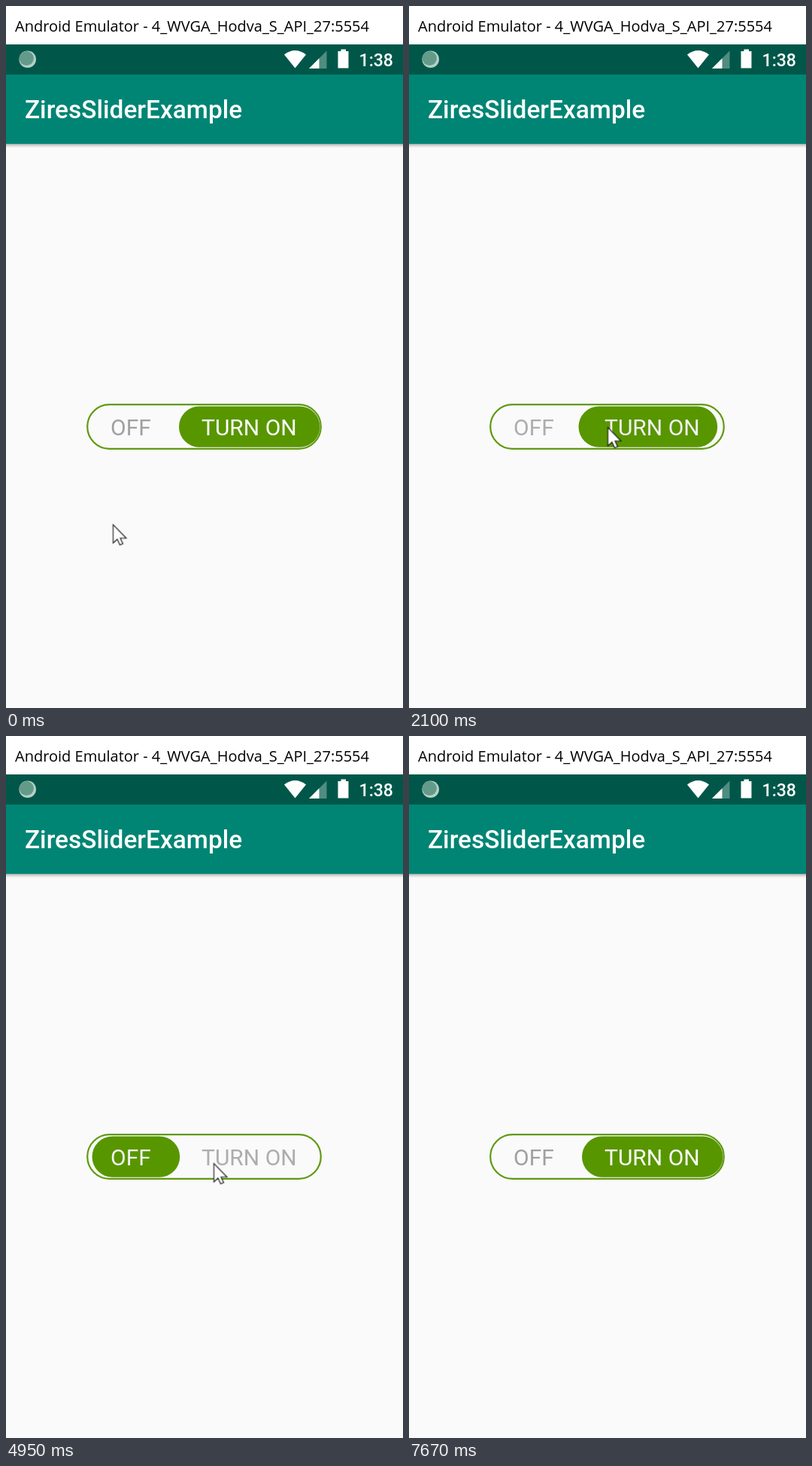
An HTML page for the animation above (9120 ms loop, 528 by 932 pixels).

```html
<!DOCTYPE html>
<html lang="en">
<head>
<meta charset="utf-8">
<title>Slider toggle</title>
<style>
  html, body { margin: 0; width: 100%; height: 100%; overflow: hidden; background: #fafafa; }
  svg { display: block; width: 100%; height: 100%; }
  text { white-space: pre; }
  .window { font: 20px "Open Sans", "Noto Sans", sans-serif; fill: #000; }
  .title { font: 500 33.4px Roboto, sans-serif; fill: #fff; }
  .clock { font: 500 23.1px Roboto, sans-serif; fill: #fff; }
  .label { font: 30px Roboto, sans-serif; }
  #thumb { fill: #589600; }
</style>
</head>
<body>
<svg viewBox="0 0 528 932">
  <defs>
    <linearGradient id="shadow" x2="0" y2="1">
      <stop offset="0" stop-color="#8c8c8c" stop-opacity=".75"/>
      <stop offset="1" stop-color="#d8d8d8" stop-opacity="0"/>
    </linearGradient>
  </defs>

  <rect width="528" height="932" fill="#fafafa"/>
  <rect width="528" height="51" fill="#fff"/>
  <text class="window" x="12" y="34">Android Emulator - 4_WVGA_Hodva_S_API_27:5554</text>

  <!-- Status bar -->
  <rect y="51" width="528" height="40" fill="#005749"/>
  <circle cx="28.7" cy="70.7" r="11.3" fill="#b4d1c6"/>
  <circle cx="27.3" cy="69.5" r="9.6" fill="#649a8a"/>
  <path d="M384.5 82.5 370 64.5Q384.5 53.5 399 64.5Z" fill="#fff"/>
  <path d="M403 83 426.5 59.5V83Z" fill="#4f8d80"/>
  <path d="M403 83 416.5 69.5V83Z" fill="#fff"/>
  <path d="M441.5 60H445.5V57.5H452V60H455.5V82.5H441.5Z" fill="#fff"/>
  <text class="clock" x="515" y="79.7" text-anchor="end">1:38</text>

  <!-- App bar -->
  <rect y="183" width="528" height="6" fill="url(#shadow)"/>
  <rect y="91" width="528" height="92" fill="#008574"/>
  <text class="title" x="25" y="148.8">ZiresSliderExample</text>

  <!-- Toggle -->
  <rect x="108.2" y="529.2" width="310.6" height="58.6" rx="29.3" fill="none" stroke="#5f9a10" stroke-width="2.2"/>
  <rect id="thumb" y="531.5" height="54.2" rx="27.1"/>
  <text id="off" class="label" x="139" y="569.9">OFF</text>
  <text id="on" class="label" x="260" y="569.9">TURN ON</text>

  <path id="cursor" d="M0 0V24.5L5.5 19.5 9 27 13 25.5 9.5 18H17.5Z" fill="#fff" stroke="#111" stroke-width="1.1"/>
</svg>
<script>
  const LOOP = 9120, SWITCH_TIME = 190;

  // Rests at `first`, then glides to each value of `moves`: { from, to, style }.
  function play(id, first, moves) {
    const frames = [{ offset: 0, ...first }];
    let rest = first;
    for (const { from, to, style } of moves) {
      frames.push({ offset: from / LOOP, ...rest }, { offset: to / LOOP, ...style });
      rest = style;
    }
    frames.push({ offset: 1, ...rest });
    document.getElementById(id).animate(frames, { duration: LOOP, iterations: Infinity });
  }

  function toggle(id, on, off) {
    const change = (from, style) => ({ from, to: from + SWITCH_TIME, style });
    play(id, on, [change(2075, off), change(4925, on)]);
  }

  const thumb = (x, width) => ({ x: x + 'px', width: width + 'px', easing: 'ease-in-out' });
  const active = { fill: '#fff' }, idle = { fill: '#a0a0a0' };
  toggle('thumb', thumb(230, 187.5), thumb(110, 114));
  toggle('on', active, idle);
  toggle('off', idle, active);

  const at = (x, y) => ({ transform: `translate(${x + .5}px, ${y + .5}px)` });
  const glide = (from, to, x, y) => ({ from, to, style: at(x, y) });
  play('cursor', at(142, 688), [
    glide(430, 1070, 247, 615),
    glide(1070, 1340, 268, 576),
    glide(1370, 1510, 264, 559),
    glide(3440, 3930, 268, 583),
    glide(4110, 4300, 276, 567),
    glide(7120, 7650, 26, 385)
  ]);
  play('cursor', { opacity: 1 }, [{ from: 7665, to: 7665, style: { opacity: 0 } }]);
</script>
</body>
</html>
```
